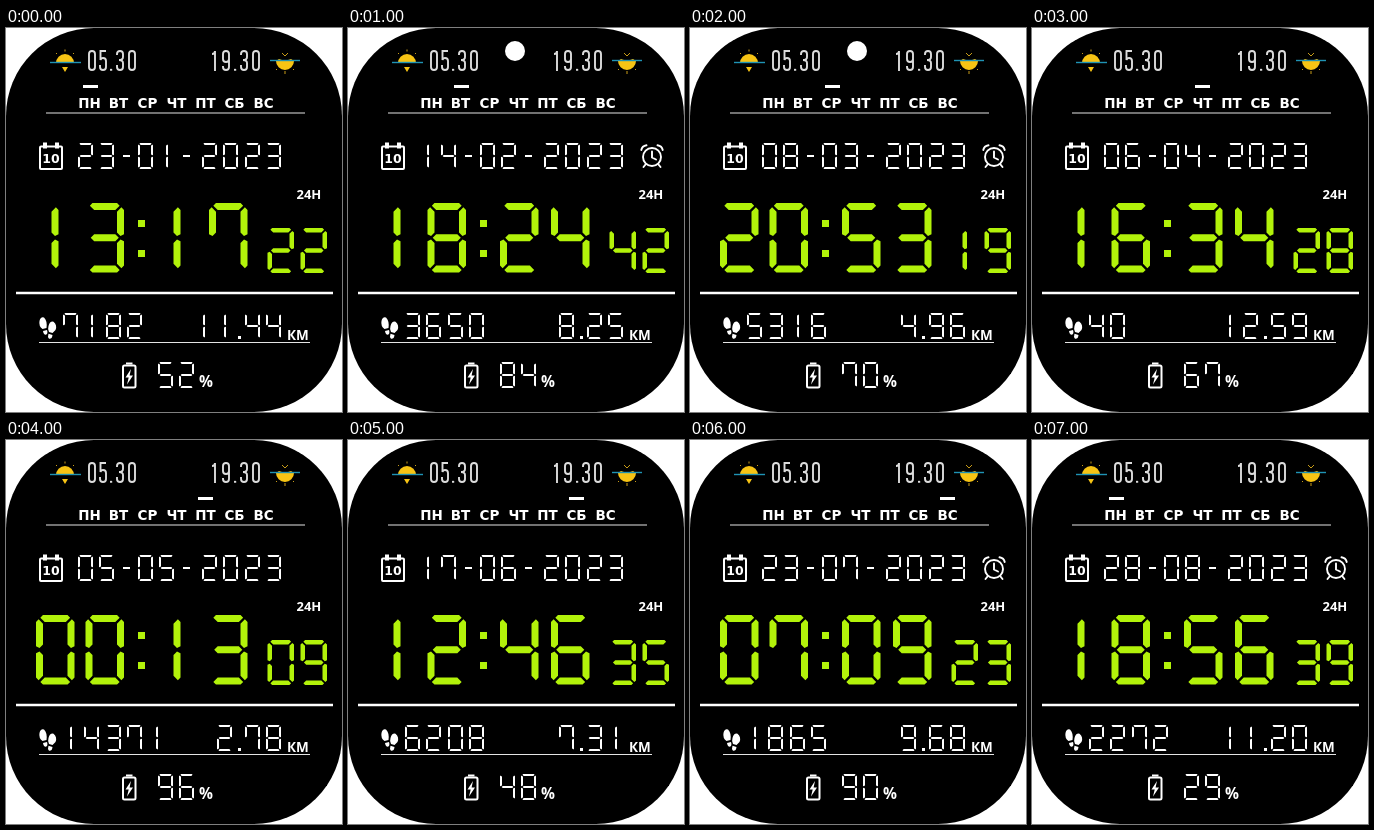
Recreate the animation shown at these times as an HTML page. Size 336x384 px, loop 8000 ms.

```html
<!DOCTYPE html>
<html lang="ru">
<head>
<meta charset="utf-8">
<title>Watch face</title>
<style>
  html, body { margin: 0; width: 100%; height: 100%; overflow: hidden; background: #fff; }
  svg { display: block; width: 336px; height: 384px; }
  text { fill: #fff; font-family: "Noto Sans", "Open Sans", sans-serif; font-weight: 700; }
  .wide { font-family: "DejaVu Sans", sans-serif; }
  .line { fill: none; stroke: #fff; stroke-width: 2; }
  .thin { fill: none; stroke: #dcdcdc; stroke-width: 1.9; }
  .lime { fill: #b2f20a; }
  .white { fill: #fff; }
</style>
</head>
<body>
<svg viewBox="0 0 336 384">
  <rect width="336" height="384" rx="88"/>

  <!-- sunrise and sunset -->
  <g transform="translate(59 34)">
    <path d="M-9 1A9 9 0 0 1 9 1Z" fill="#f7c414"/>
    <path d="M0 -10.5V-12.5M-8 -8L-9 -9M8 -8L9 -9" stroke="#c99c18"/>
    <path d="M-3 5H3L0 10Z" fill="#f7c414"/>
    <path d="M-15 .5H16" stroke="#1f93b4" stroke-width="1.4"/>
  </g>
  <g transform="translate(279 33)">
    <path d="M-9 0A9 9 0 0 0 9 0L6 -2L0 0L-6 -2Z" fill="#f7c414"/>
    <path d="M0 10V13M-8 8L-9 9M8 8L9 9M-3 -8L0 -5L3 -8" fill="none" stroke="#c99c18"/>
    <path d="M-15 -.5H15" stroke="#1f93b4" stroke-width="1.4"/>
  </g>
  <g id="sunTimes" class="thin"></g>

  <g id="days" font-size="13.5" text-anchor="middle"></g>
  <rect id="dayMark" y="57" width="15" height="3" class="white"/>
  <path d="M40 85H299M33 314.5H304" stroke="#e4e4e4"/>
  <path d="M10 265H327" stroke="#fff" stroke-width="2.7"/>

  <!-- calendar -->
  <rect x="34" y="118.5" width="22" height="22.5" rx="1" class="line"/>
  <path d="M37 114.5h4v6h-4zM49 114.5h4v6h-4z" class="white"/>
  <text x="45" y="135" font-size="12.5" text-anchor="middle" class="wide">10</text>

  <circle id="link" cx="167" cy="23" r="10" class="white"/>

  <g id="alarm" fill="none" stroke="#fff" stroke-width="1.9" stroke-linecap="round">
    <circle cx="304" cy="129" r="9"/>
    <path d="M304 123.5V129.5L308 131.5M297.5 136.5L295.5 139M310.5 136.5L312.5 139M293.3 122Q294 118 298.5 117.3M314.7 122Q314 118 309.5 117.3"/>
  </g>

  <text x="290.5" y="171" font-size="13" style="font-stretch:semi-condensed">24H</text>
  <text x="281" y="312" font-size="13.5">КМ</text>
  <text x="193" y="359" font-size="15.5">%</text>

  <!-- footprints -->
  <g class="white">
    <path d="M33.5 293Q34.5 288.5 38 289.5Q41.5 293 40.5 300L36.5 301Q32.5 298 33.5 293ZM37 303L41 302Q42.3 306 39.7 306.7Q37.5 306.5 37 303Z"/>
    <path d="M42.5 298Q43.8 293 47.5 293.7Q51.5 297 49.5 302L46.5 305L43 304Q41.5 301 42.5 298ZM42.5 305.7L46.5 307Q46 311.3 43 310.8Q41.3 309 42.5 305.7Z"/>
  </g>

  <!-- battery -->
  <g transform="translate(0 -.5)">
    <rect x="117" y="338" width="12.5" height="22" rx="1.5" class="line"/>
    <path d="M120 336H126.5" class="line"/>
    <path d="M125 341.5L119.5 350H122.7L121 357L127 348H123.6Z" class="white"/>
  </g>

  <path id="white" class="white"/>
  <path id="lime" class="lime"/>
</svg>
<script>
const $ = id => document.getElementById(id);

// date, time, seconds, steps, distance, battery, weekday, link, alarm
const STATES = [
  ['2301', '1317', '22', '7182',  '11.44', '52', 0, 0, 0],
  ['1402', '1824', '42', '3650',  '8.25',  '84', 1, 1, 1],
  ['0803', '2053', '19', '5316',  '4.96',  '70', 2, 1, 1],
  ['0604', '1634', '28', '40',    '12.59', '67', 3, 0, 0],
  ['0505', '0013', '09', '14371', '2.78',  '96', 4, 0, 0],
  ['1706', '1246', '35', '6208',  '7.31',  '48', 5, 0, 0],
  ['2307', '0709', '23', '1865',  '9.68',  '90', 6, 0, 1],
  ['2808', '1856', '39', '2272',  '11.20', '29', 0, 0, 1]
];
const STEP = 1000;
const LIT = ['abcdef', 'bc', 'abged', 'abgcd', 'fgbc', 'afgcd', 'afgedc', 'fabc', 'abcdefg', 'abcdfg'];

const poly = pts => 'M' + pts.map(p => p.map(v => v.toFixed(2)).join(' ')).join('L') + 'Z';
const box = (x, y, w, h) => `M${x} ${y}h${w}v${h}h${-w}z`;

// One segment of a digit with its top left corner at x, y; c trims the outer corners
function segment(name, x, y, w, h, t) {
  const g = t * .2 + .3, m = h / 2, k = t / 2, c = t * .75;
  const top = [[c + g, 0], [w - c - g, 0], [w - c / 2 - g, c / 2], [w - g - t, t], [g + t, t], [c / 2 + g, c / 2]];
  const side = [[0, c + g], [c / 2, c / 2 + g], [t, t + g], [t, m - k - g], [k, m - g], [0, m - k]];
  const mid = [[k + g, m], [t + g, m - k], [w - t - g, m - k], [w - k - g, m], [w - t - g, m + k], [t + g, m + k]];
  const shape = { a: top, d: top, f: side, b: side, e: side, c: side, g: mid }[name];
  const flipX = 'bc'.includes(name), flipY = 'cde'.includes(name);
  return poly(shape.map(([px, py]) => [x + (flipX ? w - px : px), y + (flipY ? h - py : py)]));
}

// The figure one stands in the middle of its cell
function digit(n, x, y, w, h, t) {
  const dx = n === '1' ? Math.round((t - w) / 2) : 0;
  return [...LIT[n]].map(s => segment(s, x + dx, y, w, h, t)).join('');
}

const small = (str, x, y) =>
  [...str].map((n, i) => digit(n, Math.round(x + i * 21.4), y, 15, 26, 2)).join('');

function show([date, time, sec, steps, dist, power, day, link, alarm]) {
  const [whole, part] = dist.split('.');
  $('white').setAttribute('d',
    small(date.slice(0, 2), 72, 115) + box(117, 127, 7, 2) +
    small(date.slice(2), 132, 115) + box(177, 127, 7, 2) +
    small('2023', 196, 115) +
    small(steps, 57, 285) +
    small(whole, 232.4 - whole.length * 21.4, 285) + box(232, 308, 3, 3) +
    small(part, 239, 285) +
    small(power, 152, 334));

  let lime = box(132, 192, 7, 7) + box(132, 222, 7, 7);
  [30, 79.5, 152, 203].forEach((x, i) => lime += digit(time[i], x, 175, 38.5, 69.5, 7));
  [261.5, 294.5].forEach((x, i) => lime += digit(sec[i], x, 200, 26.5, 45, 4.5));
  $('lime').setAttribute('d', lime);

  $('dayMark').setAttribute('x', 77 + Math.round(day * 28.8));
  $('link').style.display = link ? '' : 'none';
  $('alarm').style.display = alarm ? '' : 'none';
}

// Narrow outline figures for the sun times
const NARROW = {
  0: 'M1 4Q1 1 4 1T7 4V17Q7 20 4 20T1 17Z',
  1: 'M0 4Q3 4 3 1V21',
  3: 'M1 5V4Q1 1 4 1T7 4V7Q7 10 3 10Q7 10 7 13V17Q7 20 4 20T1 17V15',
  5: 'M7 1H1.5V10Q2 8 4 8Q7 8 7 11V17Q7 20 4 20T1 17V15',
  9: 'M1 16V17Q1 20 4 20T7 17V4Q7 1 4 1T1 4V9Q1 12 4 12T7 9',
  '.': 'M0 19.8H2.2'
};
const narrow = (str, xs) => [...str].map((c, i) =>
  `<path transform="translate(${xs[i]} 22)" d="${NARROW[c]}"/>`).join('');
$('sunTimes').innerHTML =
  narrow('05.30', [82, 93, 104, 110, 122]) +
  narrow('19.30', [206, 216, 228, 234, 246]);

$('days').innerHTML = 'ПН ВТ СР ЧТ ПТ СБ ВС'.split(' ').map((d, i) =>
  `<text class="wide" x="${83.5 + i * 29}" y="80">${d}</text>`).join('');

let current = -1;
const start = performance.now();
function tick() {
  const i = Math.floor((performance.now() - start) / STEP) % STATES.length;
  if (i !== current) show(STATES[current = i]);
  requestAnimationFrame(tick);
}
tick();
</script>
</body>
</html>
```
